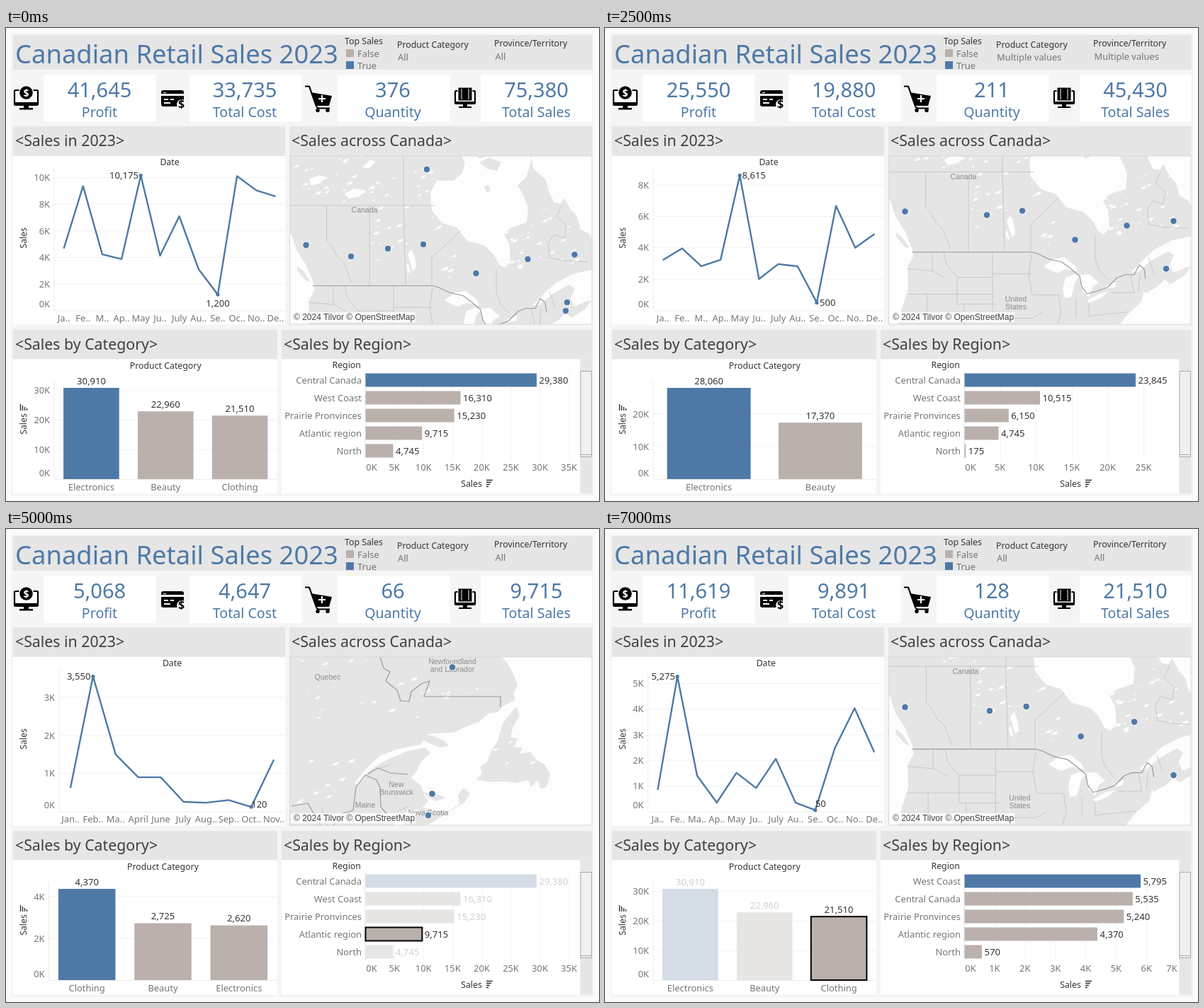
Write an HTML page that moves like this. It is 837 px wide and 669 px high and loops after 7.5 s.

```html
<!DOCTYPE html>
<html lang="en">
<head>
<meta charset="utf-8">
<title>Canadian Retail Sales 2023</title>
<style>
html, body { margin: 0; width: 100%; height: 100%; overflow: hidden; background: #f6f6f6; }
svg { display: block; width: 837px; height: 669px; }
text { font-family: "Noto Sans", "Open Sans", sans-serif; white-space: pre; }
.arial { font-family: "Liberation Sans", Arial, sans-serif; }
</style>
</head>
<body>
<svg id="stage" viewBox="0 0 837 669" xmlns="http://www.w3.org/2000/svg"></svg>
<script>
const BLUE = '#4e79a7', TAUPE = '#bab0ac', INK = '#333', GRAY = '#757575', BAR = '#e6e6e6';

// Drawing helpers; text y is the middle of the capitals
const text = (x, y, s, { size = 12.8, fill = INK, at = 'start', w = 400, cls = '', more = '' } = {}) =>
  `<text x="${x}" y="${y + size * 0.36}" font-size="${size}" fill="${fill}" text-anchor="${at}" font-weight="${w}" class="${cls}" ${more}>${s}</text>`;
const rect = (x, y, w, h, fill, more = '') =>
  `<rect x="${x}" y="${y}" width="${w}" height="${h}" fill="${fill}" ${more}/>`;
const path = (d, fill = 'none', stroke = 'none', w = 1) =>
  `<path d="${d}" fill="${fill}" stroke="${stroke}" stroke-width="${w}" stroke-linejoin="round"/>`;
const dot = (x, y, r, fill, more = '') => `<circle cx="${x}" cy="${y}" r="${r}" fill="${fill}" ${more}/>`;
const head = (x, y, s, at = 'start', more = '') => text(x, y, s, { size: 12.3, w: 500, at, more });
const gray = (x, y, s, at = 'middle') => text(x, y, s, { size: 12.9, fill: GRAY, at, w: 300 });
const num = (x, y, v, at, fill = INK) => text(x, y, v.toLocaleString('en-US'), { size: 13.1, at, fill });
const kilo = v => v / 1000 + 'K';

// Data
const MONTHS = 'Ja.. Fe.. M.. Ap.. May Ju.. July Au.. Se.. Oc.. No.. De..';
const REGIONS = ['Central Canada', 'West Coast', 'Prairie Pronvinces', 'Atlantic region', 'North'];
const CATS = ['Electronics', 'Beauty', 'Clothing'];
const zip = (names, vals) => vals.map((v, i) => [names[i], v]);

const all = {
  kpi: [41645, 33735, 376, 75380], names: MONTHS,
  line: [4670, 9370, 4230, 3870, 10175, 4130, 7100, 3120, 1200, 10120, 9050, 8600],
  bars: zip(CATS, [30910, 22960, 21510]),
  regions: zip(REGIONS, [29380, 16310, 15230, 9715, 4745]),
  map: { show: [0, 1, 2, 3, 4, 5, 6, 7, 8, 9] }
};
const twoCats = {
  ...all, cat: 'Multiple values', kpi: [30026, 23844, 248, 53870], maxSide: 1,
  line: [3800, 4070, 2820, 3525, 8665, 3200, 5030, 2800, 1150, 7640, 5030, 6280],
  bars: zip(CATS, [30910, 22960]),
  regions: zip(REGIONS, [23845, 10515, 9990, 5345, 4175]),
  map: { y: 5.5, show: [0, 1, 2, 3, 4, 5, 6, 7, 8] }
};
const someProvinces = {
  ...twoCats, prov: 'Multiple values', kpi: [25550, 19880, 211, 45430], minAt: [4, 0, 'start'],
  line: [3210, 3960, 2820, 3230, 8615, 2010, 2960, 2820, 500, 6670, 4000, 4880],
  bars: zip(CATS, [28060, 17370]),
  regions: zip(REGIONS, [23845, 10515, 6150, 4745, 175]),
  map: { y: -47.5, show: [1, 3, 4, 5, 6, 7, 8] }
};
const west = {
  ...all, kpi: [9234, 7076, 83, 16310], region: 'West Coast', left: 60.5, barLeft: 60.5, minAt: [-8, -12.5, 'middle'],
  names: 'Feb.. Ma.. April May June July Au.. Sep.. Oct.. No.. Dec..',
  line: [null, 50, 1500, 1790, 2210, 100, 2300, 910, 250, 400, 5165, 1720],
  bars: zip(['Beauty', 'Clothing', 'Electronics'], [6165, 5795, 4350]), map: { kind: 'west' }
};
const atlantic = {
  ...all, kpi: [5068, 4647, 66, 9715], region: 'Atlantic region', left: 75, barLeft: 60.5, minAt: [0, -4, 'start'],
  names: 'Jan.. Feb.. Ma.. April June July Aug.. Sep.. Oct.. Nov..',
  line: [620, 3550, 1500, 900, null, 900, 255, 230, 300, 120, 1360, null],
  bars: zip(['Clothing', 'Beauty', 'Electronics'], [4370, 2725, 2620]), map: { kind: 'east' }
};
const clothing = {
  ...all, kpi: [11619, 9891, 128, 21510], pick: 'Clothing', left: 60.5, minAt: [0, -9, 'start'],
  names: MONTHS.replace('M..', 'Ma..'),
  line: [840, 5275, 1400, 345, 1510, 915, 2060, 345, 50, 2480, 4030, 2310],
  regions: zip(['West Coast', 'Central Canada', ...REGIONS.slice(2)], [5795, 5535, 5240, 4370, 570]),
  reach: 248.5, map: { s: 1.034, x: -14.4, y: -65.4, show: [1, 3, 4, 5, 6, 9] }
};

// The remaining selections share out what is left over
const barOf = (s, n) => s.bars.find(b => b[0] === n)[1];
const others = {
  kpi: all.kpi.map((v, i) => v - west.kpi[i] - atlantic.kpi[i]),
  line: all.line.map((v, i) => Math.max(60, v - west.line[i] - atlantic.line[i])),
  bars: CATS.map(n => [n, barOf(all, n) - barOf(west, n) - barOf(atlantic, n)])
};
const part = (base, k) => ({
  kpi: base.kpi.map(v => Math.round(v * k)),
  line: base.line.map(v => Math.round(v * k / 5) * 5),
  bars: base.bars.map(([n, v]) => [n, Math.round(v * k / 5) * 5])
});
const regionPart = (i, show) => ({
  ...all, ...part(others, all.regions[i][1] / others.kpi[3]), region: REGIONS[i], map: { show }
});
const share = 22960 / 53870;
const beauty = {
  ...all, ...part(twoCats, share), bars: all.bars, pick: 'Beauty',
  regions: twoCats.regions.map(([n, v]) => [n, Math.round(v * share / 5) * 5])
};

const SCENES = [
  [0, all], [1000, twoCats], [2500, someProvinces], [3000, all],
  [3500, regionPart(0, [5, 6])], [4000, west], [4500, regionPart(2, [2, 3, 4])],
  [5000, atlantic], [5500, regionPart(4, [0])],
  [6000, { ...all, pick: 'Electronics' }], [6500, beauty], [7000, clothing]
];

// Fixed parts
const sortIcon = (x, y, turn = 0) =>
  `<g transform="translate(${x} ${y}) rotate(${turn})">${path('M-4-4H5M-4-1H3M-4 2H1M-4 5H-1', 'none', INK, 1.4)}</g>`;

function icons() {
  const screen = (x, y, w, h) => path(`M${x + 1} ${y}h${w - 2}q1 0 1 1v${h - 2}q0 1-1 1h-${w - 2}q-1 0-1-1v-${h - 2}q0-1 1-1z`, '#fff', '#000', 2.2);
  const sign = (x, y, size, fill) => text(x, y, '$', { size, fill, at: 'middle', w: 700 });
  return screen(12, 88, 33, 21) + rect(12, 105, 33, 4, '#000') + path('M24 109h9l2 5H22z') + rect(25, 109, 7, 5, '#000') + rect(19, 113, 19, 2.5, '#000') +
    dot(28.5, 91.5, 10, '#000', 'stroke="#f6f6f6" stroke-width="1.5"') + sign(28.5, 91.5, 14, '#fff') +
    rect(219, 88, 32, 23, '#000', 'rx="3"') + rect(219, 93, 32, 3, '#f6f6f6') + rect(222, 91, 4, 1, '#fff') +
    path('M223 101h6M232 101h5M223 106h9', 'none', '#fff', 1.8) + dot(248, 108, 7, '#f6f6f6') + sign(247.5, 107.5, 16, '#000') +
    path('M422 82.5h6l10 28q1 3 4 3h15', 'none', '#000', 2.2) + path('M430 91l30 5-4 14H437z', '#000') +
    path('M446 95v10M441 100h10', 'none', '#fff', 2) + dot(440, 116.5, 2.7, '#000') + dot(454, 116.5, 2.7, '#000') +
    screen(634, 89, 28, 18) + rect(634, 104, 28, 3.5, '#000') + rect(645, 107, 6, 4, '#000') + rect(639, 111, 18, 2, '#000') +
    rect(638, 84, 20, 19, '#000', 'stroke="#f6f6f6"') + path('M643 86v15M653 86v15', 'none', '#fff', 1);
}

function frame() {
  const panel = (x, y, w, h, s) => rect(x, y, w, h, BAR) +
    text(x + 3, y + 20.5, s, { size: 21.3, fill: '#3f3f3f', w: 300 });
  return rect(0, 0, 837, 669, '#fbfbfb') + rect(7, 7, 823, 655, '#f5f5f5') + rect(10, 10, 817.5, 49, BAR) +
    text(13, 37, 'Canadian Retail Sales 2023', { size: 36.4, fill: BLUE }) +
    head(478, 19, 'Top Sales') + rect(480, 30, 11, 11, TAUPE) + rect(480, 47, 11, 11, BLUE) +
    gray(496, 36, 'False', 'start') + gray(496, 53, 'True', 'start') +
    head(552, 24, 'Product Category') + head(689, 22, 'Province/Territory') +
    [53, 259, 468, 670].map((x, i) => rect(x, 66, i === 3 ? 157.5 : 158.5, 67, '#fff') +
      text([132, 337, 546, 748.5][i], 118.5, ['Profit', 'Total Cost', 'Quantity', 'Total Sales'][i], { size: 19.6, fill: BLUE, at: 'middle' })).join('') +
    icons() +
    panel(10, 139, 384, 42, '&lt;Sales in 2023&gt;') + panel(400, 139, 427.5, 42, '&lt;Sales across Canada&gt;') +
    panel(10, 427, 373, 41.5, '&lt;Sales by Category&gt;') + panel(389, 427, 438.5, 41.5, '&lt;Sales by Region&gt;') +
    rect(10, 181, 384, 238.5, '#fff') + rect(10, 468.5, 373, 190, '#fff') +
    rect(389, 468.5, 421.5, 190, '#fff') + rect(810.5, 468.5, 17, 190, BAR) +
    rect(811, 485.5, 15.5, 121, '#f0f0f0', 'stroke="#aaa"') + path('M811 603.5h15.5', 'none', '#aaa') +
    head(25, 297, 'Sales', 'middle', 'transform="rotate(-90 25 297)"') +
    head(25, 560, 'Sales', 'middle', 'transform="rotate(-90 25 560)"') + sortIcon(24.5, 537, -90) +
    head(460.5, 477, 'Region') + head(657, 644.5, 'Sales', 'middle') + sortIcon(682, 643.5);
}

// Charts
function ticks(max, step, left, right, base, height, zeroY) {
  let out = path(`M${left} ${base - height - 10}V${base + .5}H${right}`, 'none', '#ececec') + gray(left - 6, zeroY, '0K', 'end');
  for (let v = step; v <= max; v += step) {
    const y = base - v / max * height;
    out += path(`M${left} ${y}H${right}`, 'none', '#f1f1f1') + gray(left - 6, y, kilo(v), 'end');
  }
  return out;
}

function lineChart({ line, names, left = 68, maxSide = -1, minAt = [0, 12, 'middle'] }) {
  const vals = line.filter(v => v !== null), max = Math.max(...vals), min = Math.min(...vals);
  const step = (394 - left) / vals.length, labels = names.split(' ');
  const pts = vals.map((v, i) => [left + step * (i + .5), 399.5 - v / max * 191]);
  const [hx, hy] = pts[vals.indexOf(max)], [lx, ly] = pts[vals.indexOf(min)];
  const [dx, dy, at] = minAt;
  return head((left + 394) / 2, 189.5, 'Date', 'middle') +
    ticks(max, max > 6000 ? 2000 : 1000, left, 393, 399.5, 191, 390) +
    path('M' + pts.join('L'), 'none', BLUE, 2.4) + dot(hx, hy, 2.6, BLUE) + dot(lx, ly, 2.6, BLUE) +
    num(hx + maxSide * 3.3, 208, max, maxSide < 0 ? 'end' : 'start') + num(lx + dx, ly + dy, min, at) +
    pts.map(([x], i) => gray(x, 410.5, labels[i])).join('');
}

const look = (name, i, pick) => {
  const faded = pick && pick !== name;
  return {
    fill: faded ? (i ? '#e7e6e4' : '#d4dce5') : (i ? TAUPE : BLUE),
    ink: faded ? '#d0d0d0' : INK,
    edge: pick === name ? 'stroke="#000" stroke-width="2"' : ''
  };
};

function barChart({ bars, pick, barLeft = 68 }) {
  const max = bars[0][1], slot = (382.5 - barLeft) / bars.length, w = slot * .75;
  return head((barLeft + 382.5) / 2, 477.5, 'Product Category', 'middle') +
    ticks(max, max > 20000 ? 10000 : max > 9000 ? 5000 : max > 3000 ? 2000 : 1000, barLeft, 382.5, 638, 129, 629) +
    bars.map(([name, v], i) => {
      const cx = barLeft + slot * (i + .5), h = v / max * 129, l = look(name, i, pick);
      return rect(cx - w / 2, 638 - h, w, h, l.fill, l.edge) +
        num(cx, 628 - h, v, 'middle', l.ink) + gray(cx, 649.5, name);
    }).join('');
}

function regionChart({ regions, region, reach = 241.5 }) {
  const px = reach / regions[0][1], step = regions[0][1] > 8000 ? 5000 : 1000;
  let out = gray(516, 621, '0K');
  for (let v = step; v * px < 302; v += step) {
    const x = 507.5 + v * px;
    out += path(`M${x} 486V610`, 'none', '#f1f1f1') + gray(Math.min(x - .5, 800), 621, kilo(v));
  }
  return out + path('M507 486V610', 'none', '#e4e4e4') + regions.map(([name, v], i) => {
    const y = 498 + i * 25, w = v * px, l = look(name, i, region);
    return gray(502, y, name, 'end') + rect(507.5, y - 9.5, w, 19, l.fill, l.edge) + num(511 + w, y, v, 'start', l.ink);
  }).join('');
}

// Maps
const LAND = '#e5e5e5', SEA = '#fdfdfd';
const PLACES = [[594, 200], [423.5, 307], [487, 323], [539, 312], [589, 306], [663.5, 347], [736.5, 327], [802.5, 320.5], [792, 388], [790, 400]];
const place = (x, y, ...rows) => rows.map((s, i) =>
  text(x, y + i * 11.5, s, { size: 10.5, fill: '#8b8b8b', at: 'middle', cls: 'arial' })).join('');
const marker = ([x, y]) => dot(x, y, 4.8, BLUE, 'stroke="#fff"');
const border = (d, dark) => path(d, 'none', dark ? '#9a9a9a' : '#c6c6c6', dark ? 1.2 : .9);

function lakes(seed, n, x0, y0, w, h) {
  const rnd = () => (seed = seed * 16807 % 2147483647) / 2147483647;
  let d = '';
  for (let i = 0; i < n; i++) {
    const x = x0 + rnd() * w, y = y0 + rnd() * h, r = 1 + rnd() * 4;
    d += `M${x} ${y}l${r} ${-r * .8}l${r * 1.3} ${-r * .3}l${-r * .6} ${r}z`;
  }
  return path(d, SEA);
}

function nationMap({ x = 0, y = 0, s = 1, show }) {
  const at = ([px, py]) => [px * s + x, py * s + y];
  const [cx, cy] = at([506, 257.5]), [ux, uy] = at([580, 430.5]);
  return `<g transform="translate(${x} ${y}) scale(${s})">` +
    lakes(71, 42, 405, 172, 190, 75) + lakes(19, 26, 515, 255, 120, 100) + lakes(83, 34, 700, 250, 100, 95) +
    path('M428 214l14-6 10 3-9 9-12 3zM478 234l13-7 16 3-9 9-14 2zM503 197l11-11 8 3-9 9z', SEA) +
    path('M632 216l12-11 4-15-10-18H660l8 13 18-6 16-10h28l12 16-7 25-13 13 6 9 9 21-2 22-23 8-9 9 7 13 2 25-8 9-8-4-8-15-12-12-25-7-15-19-20-6-15-18-2-25 9-17z', SEA) +
    path('M668 190l14-7 17 7-6 12-14-3zM675 224l6-2 3 8-6 3z', LAND) +
    path('M740 170H830V304l-7-13-12-6-5-18-10-12-8-15-5 8-9-1-8-16-4-16-18-16z', SEA) +
    path('M390 285l13 7 7 22 14 22 10 25 1 10-8 15 1 30-10 32-6 30H390z', SEA) + path('M411 337l9 7 10 15-7-2-12-14z', LAND) +
    path('M743 392l13-13 19-18 25-13 30-7V480H715l24-29 18-16 4-16 12-9 13-9-10-13-13 5z', SEA) +
    path('M748 396l22-19 25-14 8 6-6 13 5 12 16-7 9-2-10 13-19 12-8-7-10 10-17 10z', LAND) +
    path('M567 320l5-7 5 11 2 15-5 5-3-11zM565 335l3-2 3 14-4-2zM619 385l15-11 15-2 15 12 4 8-18-3-12 5-8-3zM650 400l12-4 10 1-8 9-6 22-9 2-3-14zM670 397l14-1 13 12-9 5-5 15-8-7zM680 433l16-9 14-4-9 9-17 7zM707 412l15-5-2 7-12 2z', SEA) +
    border('M400 251H605M452.5 251V300l7 8 8 15 10 10 10 27M513 251V364M561 170V251L564 364M601 364V325L641 287') +
    border('M692 341V375l6 16 12 12M785 250l-8 17 14 12-3 18-15-5-8 13 3 20 18 4 36 2M767 372l8 24') +
    border('M427 388l35 3 18 10M462 364v27M478 364l4 18 15 18h50M547 364V430M497 400v38h55M547 395h55M602 368l-4 27 5 30h37M428 424h119v34M455 424v40M507 438v36M552 458h50l15-8M640 425l4 25-6 18M665 430v25M683 437v20M683 455l25-3M714 422h32M710 452l29-3M742 398l5 25M755 396l-2 25') +
    border('M433 364.5H602l8 2 17 8 18 4 13 10 12 10 3 15 7 10 15-4 14-5 14-14 11-4h13l7-14 7 6 2 14', true) +
    '</g>' + place(cx, cy, 'Canada') + place(ux, uy, 'United', 'States') + show.map(i => marker(at(PLACES[i]))).join('');
}

function westMap() {
  return path('M400 192l12 9 22 10 24 7 20 7 8 15 16 12 12 17 13 16 16 15 5 22 8 17 15 9 13 16 19 17 15 20 8 18H400z', SEA) +
    path('M527 292l10 8 8 10-3 9-9-10zM537 320l9 5 8 18-5 12-9-16zM570 364l15 6 16 14 12 16-10 2-17-15z', LAND) +
    path('M522 286l9 12 11 5M550 322l18 8M570 344l15-2M602 382l14-6M626 403l7-7 5 12-5 12z', 'none', SEA, 3) +
    lakes(43, 16, 580, 190, 230, 40) + lakes(57, 12, 600, 225, 55, 160) + lakes(31, 8, 765, 235, 55, 70) +
    border('M482 219H827M662.5 219V333l9 6 9 15 14 12 10 16 12 21M758.5 219V403M582 181l8 10 12-4 7 12 14 7 4 13') +
    border('M632 418l18-5 25 1M700 404l5 15M758 404v15') +
    border('M459.5 181V212l12 1 16 12 4 14 9-12 12-3 8 14 16 16 8 17 14 6 8 17-3 16 M632 403.5H827', true) +
    text(747, 231, 'Canada', { size: 12, fill: '#777', at: 'middle', cls: 'arial' }) +
    place(613, 302, 'British', 'Columbia') + place(716, 333, 'Alberta') + place(800, 315, 'Saskatchewan') + marker([613.5, 310]);
}

function eastMap() {
  return rect(400, 181, 428, 239, SEA) +
    path('M400 181H700l8 9 9 16 5 15-6 12 3 9-18 9-7 8-13 2-14 12-19 7-16 8-22 1-14 1-11 15-32 6-25 10-17 15-19 23 4 2 20-22 24-14 27-11 25-5 7 8-14 13-5 12-8 10 14 11 4 13 6 9-10 11-20 3-13 13-14 16H400z', LAND) +
    path('M560 419l10-13 18-12 17 4 20 1 15-10-2-13 8-10 9 8-8 13-17 10-20 13-16 9zM588 371l10 4 13 1 10 4-14 5-13-6zM582 291l19 1 19 8 5 7-13 2-19-8z', LAND) +
    path('M720 251l5 13-9 15-4 15 10 3-5 11 12 1-4 9 15-3 9 12 11 6 8 14-5 18-9 3-3-13-10 10-4-10-16 4-18-2-18 1-21-3 8-10-3-9 10-6 5-15 10-15 7-25z', LAND) +
    lakes(23, 26, 415, 185, 250, 90) + lakes(61, 10, 685, 300, 60, 35) + lakes(91, 10, 410, 325, 80, 65) +
    border('M528 181l5 16 9 5-6 13 16 13 5 15 12 1 3-14 14-11 12-4-8 22H698V252', true) +
    border('M462 419l13-17 15-4 4-33 13-17 16 7 5 11 1 27 10 12M510 347l15-9 17 7 25 2M403 392l23-4 18 31', true) +
    border('M528 338l18-6M556 398l13-6M453 419l-8-25M482 400l4 19') +
    place(454, 209, 'Quebec') + place(630, 187, 'Newfoundland', 'and Labrador') + place(551, 361, 'New', 'Brunswick') +
    place(507, 390, 'Maine') + place(596, 401, 'Nova Scotia') + [[630, 195.5], [601.5, 374.5], [596, 405]].map(marker).join('');
}

function mapView(m) {
  const body = m.kind === 'west' ? westMap() : m.kind === 'east' ? eastMap() : nationMap(m);
  return `<g clip-path="url(#mapBox)">${rect(400, 181, 428, 239, LAND)}${body}` +
    (m.kind === 'west' ? '' : rect(402, 402, 176, 14.5, '#fff', 'fill-opacity=".85"')) + '</g>' +
    text(406, 409, '© 2024 Tilvor © OpenStreetMap', { size: 12, fill: '#444', cls: 'arial' }) +
    rect(400.5, 181, 426.5, 238, 'none', 'stroke="#d8d8d8"');
}

function scene(s) {
  const choice = (x, v = 'All') => gray(x, v === 'All' ? (x < 600 ? 41.5 : 40) : (x < 600 ? 41.5 : 40.5), v, 'start');
  return choice(553, s.cat) + choice(690.5, s.prov) +
    s.kpi.map((v, i) => text([132, 337, 546, 748.5][i], 88, v.toLocaleString('en-US'), { size: 29, fill: BLUE, at: 'middle' })).join('') +
    lineChart(s) + mapView(s.map) + barChart(s) + regionChart(s);
}

const stage = document.getElementById('stage');
stage.innerHTML = `<defs><clipPath id="mapBox">${rect(400, 181, 427.5, 238.5, '#000')}</clipPath></defs>` + frame() +
  SCENES.map(([, s]) => `<g class="scene" visibility="hidden">${scene(s)}</g>`).join('');
const layers = [...stage.querySelectorAll('.scene')];

const LOOP = 7500, start = performance.now();
let shown = -1;
function tick() {
  const t = (performance.now() - start) % LOOP;
  const now = SCENES.filter(([from]) => from <= t).length - 1;
  if (now !== shown) {
    layers.forEach((g, i) => g.setAttribute('visibility', i === now ? 'visible' : 'hidden'));
    shown = now;
  }
  requestAnimationFrame(tick);
}
tick();
</script>
</body>
</html>
```
